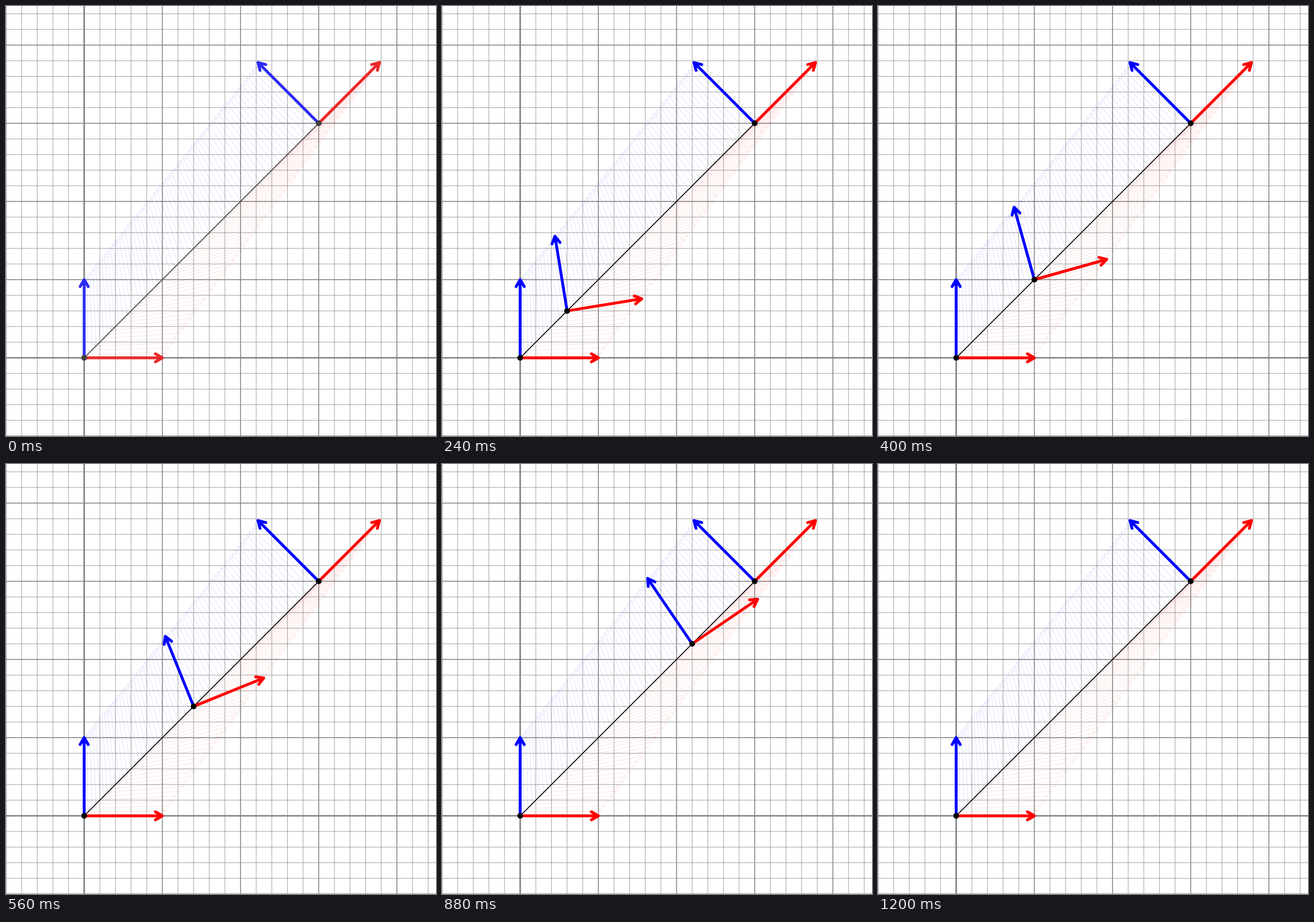
Recreate the animation shown at these times as an HTML page with a canvas. Size 748 by 748 pixels, loop 1220 ms.

```html
<!DOCTYPE html>
<html lang="en">
<head>
<meta charset="utf-8">
<title>Moving frame along a line</title>
<style>
  html, body { margin: 0; width: 100%; height: 100%; overflow: hidden; background: #fff; }
  canvas { display: block; width: 748px; height: 748px; }
</style>
</head>
<body>
<canvas id="stage" width="748" height="748"></canvas>
<script>
const SIZE = 748, UNIT = 136, STEPS = 60, STEP_MS = 20;
const LOOP = (STEPS + 1) * STEP_MS;
const ORIGIN = { x: 136, y: 612 };
const TRAVEL = 3 * UNIT;
const END = 0.777;

const VIVID = { red: '#f00', blue: '#00f', ink: '#000' };
const MUTED = { red: '#eb2a2a', blue: '#2d2df0', ink: '#404040' };

const ctx = document.getElementById('stage').getContext('2d');
ctx.lineCap = ctx.lineJoin = 'round';

function line(x1, y1, x2, y2, color, width) {
  ctx.strokeStyle = color;
  ctx.lineWidth = width;
  ctx.beginPath();
  ctx.moveTo(x1, y1);
  ctx.lineTo(x2, y2);
  ctx.stroke();
}

function gridLine(pos, vertical, color, width) {
  if (vertical) line(pos, 0, pos, SIZE, color, width);
  else line(0, pos, SIZE, pos, color, width);
}

function grid() {
  const minor = UNIT / 5;
  for (const [start, vertical] of [[ORIGIN.x, true], [ORIGIN.y, false]]) {
    for (let k = -23; k <= 23; k++) {
      if (k % 5) gridLine(start + k * minor, vertical, '#8c8c8c', 0.8);
    }
    for (let k = -5; k <= 5; k++) {
      if (k) gridLine(start + k * UNIT, vertical, '#808080', 1.5);
    }
    gridLine(start, vertical, '#808080', 2.7);
  }
}

function arrow(x, y, dx, dy, color, width, head) {
  const tx = x + dx, ty = y + dy, angle = Math.atan2(dy, dx);
  const wing = side => [
    tx - head * Math.cos(angle + side * Math.PI / 6),
    ty - head * Math.sin(angle + side * Math.PI / 6)
  ];
  ctx.strokeStyle = color;
  ctx.lineWidth = width;
  ctx.beginPath();
  ctx.moveTo(x, y);
  ctx.lineTo(tx, ty);
  ctx.moveTo(...wing(1));
  ctx.lineTo(tx, ty);
  ctx.lineTo(...wing(-1));
  ctx.stroke();
}

// Base point and the two vectors, blended linearly for s in 0..1
function pair(s, colors, width, head) {
  const x = ORIGIN.x + TRAVEL * s, y = ORIGIN.y - TRAVEL * s;
  const along = UNIT * (1 - s + END * s), across = UNIT * END * s;
  arrow(x, y, along, -across, colors.red, width, head);
  arrow(x, y, -across, -along, colors.blue, width, head);
  return [x, y];
}

function dot(x, y, color) {
  ctx.fillStyle = color;
  ctx.beginPath();
  ctx.arc(x, y, 5, 0, 2 * Math.PI);
  ctx.fill();
}

function draw(step) {
  const colors = step ? VIVID : MUTED;
  ctx.fillStyle = '#fff';
  ctx.fillRect(0, 0, SIZE, SIZE);
  grid();

  ctx.globalAlpha = 0.08;
  for (let k = 0; k <= STEPS; k++) pair(k / STEPS, VIVID, 1.5, 7.5);
  ctx.globalAlpha = 1;

  line(ORIGIN.x, ORIGIN.y, ORIGIN.x + TRAVEL, ORIGIN.y - TRAVEL, colors.ink, 1.7);
  const stops = new Set([0, 1, step / STEPS]);
  const bases = [...stops].map(s => pair(s, colors, 5, 14));
  for (const [x, y] of bases) dot(x, y, colors.ink);
}

function tick() {
  draw(Math.floor(performance.now() % LOOP / STEP_MS));
  requestAnimationFrame(tick);
}
tick();
</script>
</body>
</html>
```
